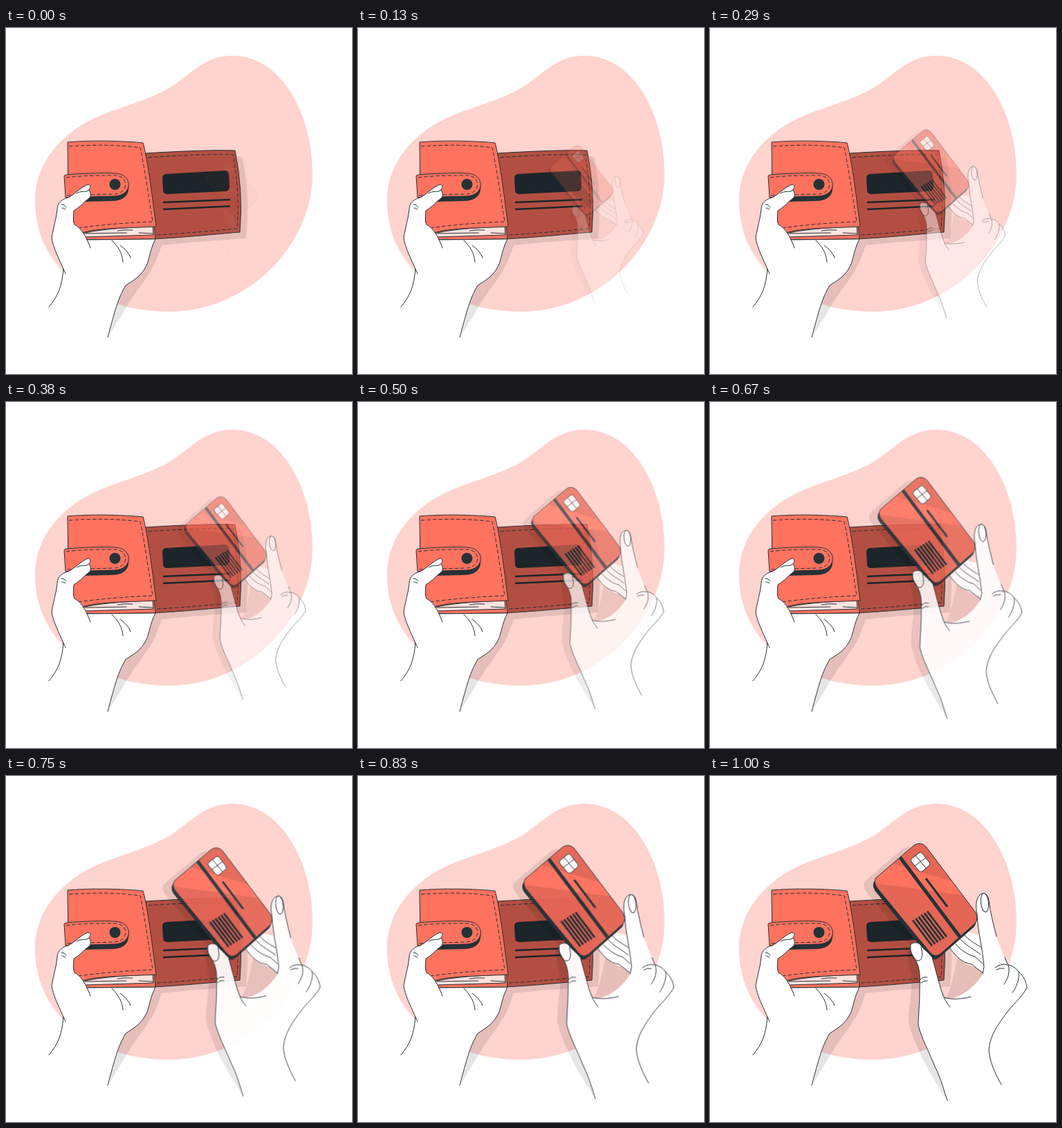
An HTML page that plays this animation: 500x500 px, repeating every 1040 ms.

```html
<!DOCTYPE html>
<html lang="en">
<head>
<meta charset="utf-8">
<title>Wallet and card</title>
<style>
html, body { margin: 0; height: 100%; overflow: hidden; background: #fff; }
svg { display: block; width: 100vw; height: 100vh; }
.line { fill: none; stroke: #263238; stroke-width: 1; stroke-linecap: round; stroke-linejoin: round; }
.edge { stroke: #263238; stroke-width: 1; stroke-linejoin: round; }
.dash { fill: none; stroke: #263238; stroke-width: 1; stroke-dasharray: 5.5 3; }
.coral { fill: #ff725e; }
.dark { fill: #263238; }
.white { fill: #fff; }
.bar { fill: none; stroke: #263238; }
</style>
</head>
<body>
<svg viewBox="0 0 500 500">
  <defs>
    <path id="card" d="M240,147 L295,100 Q304,94 312,102 L383,196 Q389,206 383,213 L333,257 Q325,263 318,255 L241,161 Q236,153 240,147Z"/>
    <clipPath id="cardClip"><use href="#card"/></clipPath>
  </defs>

  <path fill="#ffd3ce" d="M327,40 C398,40 443,125 443,210 C443,312 352,410 235,410 C135,410 42,352 42,250 C42,194 82,148 140,125 C174,112 203,104 228,91 C262,74 282,40 327,40Z"/>

  <!-- wallet and left hand shadow -->
  <path opacity=".1" d="M331,185 L341,186 C351,230 350,270 347,304 C305,307 260,310 225,314 C215,345 207,355 195,372 C180,390 165,420 148,446 L165,380 L205,335 L216,300Z"/>

  <!-- inner panel -->
  <path class="edge" fill="#b34f42" d="M202,181 C250,178 300,176 331,177 Q343,235 338,295 C300,298 255,303 210,305Z"/>
  <path class="dash" d="M206,187 C250,184 300,182 328,183 Q338,235 334,290 C300,293 255,297 217,299"/>
  <path fill="#1c2529" d="M232,211 L316,206 Q322,206 322,212 L323,230 Q323,235 317,236 L233,240 Q227,240 227,234 L226,217 Q226,211 232,211Z"/>
  <path stroke="#1c2529" stroke-width="2.6" d="M227,252 L324,248 M227,262 L324,257.5"/>

  <!-- front cover and notes -->
  <path class="edge coral" d="M98,285 L214,285 L216,305 L98,306Z"/>
  <path class="edge" fill="#ffe3df" d="M106,298 Q140,289 212,287 L213,299 L114,302Z"/>
  <path class="line" d="M114,297 L174,296 M161,293 Q172,291 183,292 M192,296 L212,297"/>
  <path class="edge coral" d="M89,165 C120,162 170,163 198,166 C205,190 212,250 217,287 C180,289 130,289 110,296 L98,286 L97,262 L90,240Z"/>
  <path class="dash" d="M91,171 C130,168 165,169 194,173 C200,200 207,250 212,280 C180,281 140,284 104,289"/>

  <!-- strap -->
  <path class="dark" d="M110,240 L160,234 L177,225 Q180,249 154,250 L112,251Z"/>
  <path class="edge coral" d="M88,212 C110,210 140,209 158,210 C184,211 184,243 156,243 L86,245 Q85,228 84,214 Q84,212 88,212Z"/>
  <path class="dash" d="M87,216 C110,213 140,213 158,213 C178,214 178,240 155,240 L88,242"/>
  <circle class="dark" cx="157.500" cy="226" r="8"/>

  <!-- left hand -->
  <path class="white" d="M62,403 C76,387 81,372 83,348 C75,330 68,317 66,303 C68,290 73,275 74,262 C74,252 82,247 90,245 C100,240 109,229 119,226 C123,227 122,231 120,234 C123,239 123,243 120,246 C112,252 108,258 98,264 C97,275 97,280 99,284 C109,289 114,299 117,306 L216,305 C208,320 207,335 203,343 C195,360 183,365 173,372 C162,390 157,410 147,447 L80,447Z"/>
  <path class="line" d="M62,403 C76,387 81,372 83,348 M86,355 C75,330 68,317 66,303 C68,290 73,275 74,262 C74,252 82,247 90,245 C100,240 109,229 119,226 C123,227 122,231 120,234 C123,239 123,243 120,246 C112,252 108,258 98,264 C97,275 97,280 99,284 C110,290 117,304 122,318 M102,239 C108,234 115,239 120,234 M80,255 Q85,255 87,259 M81,260 Q84,260 86,262 M117,306 L216,305 C208,320 207,335 203,343 C195,360 183,365 173,372 C162,390 157,410 147,447 M153,307 C163,317 168,326 169,338 M165,314 C173,320 178,326 180,332"/>

  <!-- card held by the right hand: outer group fades, inner group grows -->
  <g id="fade"><g id="held">
    <g opacity=".1">
      <use href="#card" x="-16" y="5"/>
      <path d="M284,250 C287,275 294,290 290,315 C288,335 287,345 287,355 C291,375 305,412 343,469 L345,325 C365,322 387,303 396,284 L360,250 C354,275 352,300 341,321 L310,262Z"/>
    </g>
    <path class="white" d="M350,246 L372,225 L390,230 L398,286 Q391,281 383,276 Q362,271 347,250Z"/>
    <path class="line" d="M347,249 C356,262 365,270 378,272 Q386,278 393,284 M355,243 C364,253 374,259 383,261 L394,271 M362,236 C372,247 383,251 391,258 M368,230 C376,239 385,243 391,247"/>
    <use href="#card" class="edge dark" x="-2" y="5"/>
    <g clip-path="url(#cardClip)">
      <path class="coral" d="M220,80 H400 V280 H220Z"/>
      <path fill="#e56655" d="M230,154 L400,177 V280 H240Z M262,126 L300,80 L400,120 L370,158Z"/>
      <path class="bar" stroke-width="5" d="M272,114 L366,239"/>
    </g>
    <use href="#card" class="line"/>
    <path class="edge white" d="M292,119 L302,111 Q305,109 307,112 L317,125 Q319,128 316,130 L308,137 Q305,140 302,137 L291,124 Q289,121 292,119Z"/>
    <path class="line" d="M297,115 L312,133 M296,130 L312,118"/>
    <path class="bar" stroke-width="3" d="M312,148 L343,189"/>
    <path id="rows" class="bar" stroke-width="2.900"/>
    <path class="white" d="M343,469 C338,455 335,440 325,420 C315,395 306,380 301,360 C301,345 303,330 303,310 C303,300 305,283 299,270 C296,262 288,255 289,246 C291,240 300,239 304,244 C308,250 316,255 321,262 C326,280 331,300 335,312 Q338,321 343,322 C362,322 385,303 394,286 L396,276 C394,250 387,225 386,200 C383,187 385,175 391,171 C397,167 402,172 403,180 C405,198 410,215 414,232 C419,248 426,262 430,272 Q442,276 446,283 C453,289 457,297 458,306 C450,320 440,328 432,338 C415,360 405,375 403,395 C403,410 412,430 421,446Z"/>
    <path class="line" d="M343,469 C338,455 335,440 325,420 C315,395 306,380 301,360 C301,345 303,330 303,310 C303,300 305,283 299,270 C296,262 288,255 289,246 C291,240 300,239 304,244 C308,250 316,255 321,262 C326,280 331,300 335,312 Q339,325 347,334 M338,320 C350,324 365,322 377,319 M394,286 L396,276 C394,250 387,225 386,200 C383,187 385,175 391,171 C397,167 402,172 403,180 C405,198 410,215 414,232 M426,262 L430,272 Q442,276 446,283 C453,289 457,297 458,306 C450,320 440,328 432,338 C415,360 405,375 403,395 C403,410 412,430 421,446"/>
    <path class="line" d="M290,246 C289,256 293,265 300,267 C307,267 308,259 305,247 M303,295 Q308,289 314,291 M305,299 Q309,295 314,296 M412,277 Q420,270 430,273 M414,280 Q419,277 425,278 M431,273 C434,285 430,293 425,301 M446,283 C448,293 442,307 437,313"/>
    <ellipse class="edge white" cx="397" cy="183" rx="5.500" ry="13.500" transform="rotate(-6 397 183)"/>
  </g></g>
</svg>
<script>
const LOOP = 1040, STEPS = 25;
const fade = document.getElementById("fade");
const held = document.getElementById("held");

let rows = "";
for (let i = 0; i < 6; i++) rows += `M${293 + i * 4.2},${208.5 - i * 2.6} l28,37 `;
document.getElementById("rows").setAttribute("d", rows);

function draw(now) {
  const t = now % LOOP;
  const step = Math.min(STEPS - 1, Math.floor((t + 4) / (LOOP / STEPS)));
  const ease = Math.sin(Math.PI / 2 * Math.min(1, (step + 0.5) / 24.2));
  const scale = 0.5 + 0.5 * ease;
  held.setAttribute("transform", `translate(340 284) scale(${scale}) translate(-340 -284)`);
  fade.setAttribute("opacity", ease);
}

function tick() {
  draw(performance.now());
  requestAnimationFrame(tick);
}
tick();
</script>
</body>
</html>
```
